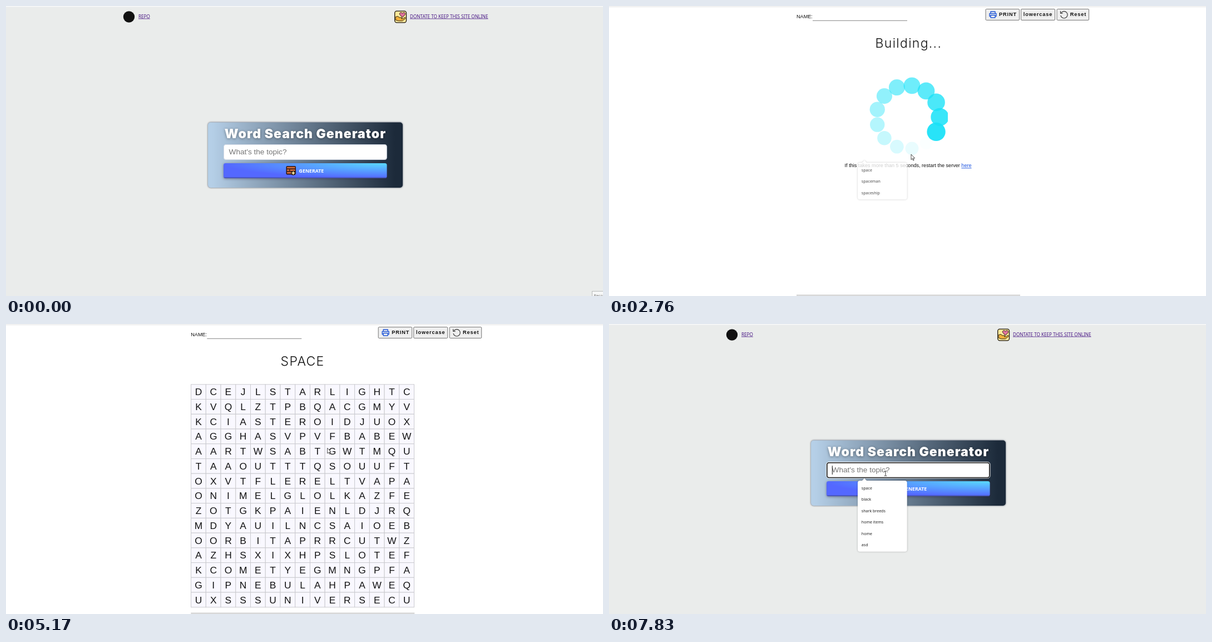
Recreate the animation shown at these times as an HTML page. Size 1073 by 522 pixels, loop 8 s.

```html
<!DOCTYPE html>
<html lang="en">
<head>
<meta charset="utf-8">
<title>Word Search Generator</title>
<style>
html, body { margin: 0; width: 100%; height: 100%; overflow: hidden; background: #fff; }
svg { display: block; width: 1073px; height: 522px; }
text { white-space: pre; }
.sans { font-family: "Liberation Sans", Arial, sans-serif; }
.noto { font-family: "Noto Sans", "Open Sans", sans-serif; }
.head { font-family: Inter, Roboto, sans-serif; text-anchor: middle; }
.link { font-size: 8.13px; font-weight: 500; fill: #4b1a86; text-decoration: underline; }
.card { filter: drop-shadow(0 0 1.5px rgba(25, 35, 55, .75)); }
.brand { font-size: 23px; font-weight: 900; letter-spacing: 1px; fill: #fff; filter: drop-shadow(0 1.5px 2.5px rgba(0, 0, 0, .4)); }
.title { font-size: 23px; font-weight: 300; letter-spacing: 1.3px; fill: #111; }
.cta { filter: drop-shadow(0 1.5px 2px rgba(45, 35, 66, .5)); }
.field { font-size: 13.6px; }
.list { filter: drop-shadow(0 .5px 1.5px rgba(0, 0, 0, .28)); }
.list text { font-size: 7.07px; font-weight: 500; fill: #222; }
.small { font-size: 9.1px; fill: #111; }
.btn rect { fill: #efefef; stroke: #767676; }
.btn text { font-size: 9.2px; font-weight: 700; letter-spacing: .9px; fill: #111; }
.grid rect { fill: #f9f8ff; stroke: #cbcbcf; }
.grid text { font-size: 17.4px; text-anchor: middle; fill: #111; }
</style>
</head>
<body>
<svg viewBox="0 0 1073 522">
  <defs>
    <linearGradient id="cardFill">
      <stop offset="0.02" stop-color="#b5cfe7"/>
      <stop offset="0.96" stop-color="#1c2a3a"/>
    </linearGradient>
    <radialGradient id="ctaFill" cx="1" cy="0" r="1">
      <stop offset="0" stop-color="#5adaff"/>
      <stop offset="1" stop-color="#5468ff"/>
    </radialGradient>
    <clipPath id="ctaClip"><rect x="391" y="283" width="293.6" height="27" rx="3.5"/></clipPath>
    <clipPath id="spinClip"><rect x="467" y="128" width="142" height="143"/></clipPath>
  </defs>

  <g id="home">
    <rect width="1073" height="522" fill="#eaeceb"/>
    <rect width="1073" height="1.5" fill="#f9f9f9"/>
    <circle cx="221" cy="19.5" r="10.2" fill="#111"/>
    <text class="noto link" x="238" y="21.6">REPO</text>
    <g id="donate" stroke="#1a1208" stroke-linejoin="round">
      <rect x="698.7" y="9.2" width="20.8" height="20.6" rx="3.5" fill="#fdea9c" stroke-width="1.3"/>
      <path d="M712.5 20.5 707.8 15.6C706 12.6 709.8 10 712.5 13 715.2 10 719 12.6 717.2 15.6Z" fill="#e0729c" stroke-width=".9"/>
      <path d="M700.2 19.5 704 18.6 707.5 20.8H711.5Q712.6 22.4 710.6 23L713.4 22.8 717 20.4Q718.8 21 717.8 22.6L712.4 26.8H705.5L700.2 25.2Z" fill="#f0b13c" stroke-width=".9"/>
    </g>
    <text class="noto link" x="726" y="21.6">DONTATE TO KEEP THIS SITE ONLINE</text>

    <rect class="card" x="363" y="209.5" width="350" height="117.5" rx="5" fill="url(#cardFill)"/>
    <text class="head brand" x="538" y="238">Word Search Generator</text>

    <rect x="391.5" y="249.5" width="292.8" height="27" rx="3.5" fill="#fff" stroke="#d3dae6"/>
    <g id="focus" fill="none">
      <rect x="390.6" y="248.5" width="294.4" height="29" rx="4.5" stroke="#fff"/>
      <rect x="391.8" y="249.7" width="292" height="26.8" rx="3.5" stroke="#101010" stroke-width="1.6"/>
    </g>
    <text id="topic" class="sans field" x="400.6" y="267.2"></text>
    <rect id="caret" y="255" width="1" height="16" fill="#111"/>

    <g class="cta">
      <rect x="391" y="283" width="293.6" height="27" rx="3.5" fill="url(#ctaFill)"/>
      <rect x="391" y="308.3" width="293.6" height="1.7" fill="#3a416f" opacity=".5" clip-path="url(#ctaClip)"/>
    </g>
    <rect x="503.5" y="288" width="17.5" height="15.5" rx="2" fill="#2b1512"/>
    <path d="M505 289.6h14.6v3h-14.6zM505 294h4.2v3h-4.2zM510.4 294h9.2v3h-9.2zM505 298.4h8v3.4h-8z" fill="#cc6a3c"/>
    <circle cx="516.3" cy="300.6" r="4.2" fill="#3a2418"/>
    <path d="M516.3 297l1.1 2.5 2.5 1.1-2.5 1.1-1.1 2.5-1.1-2.5-2.5-1.1 2.5-1.1z" fill="#fff0a8"/>
    <text class="noto" x="526.6" y="300.1" font-size="8.8" font-weight="600" fill="#fff">GENERATE</text>

    <g id="tip">
      <rect x="1053.5" y="513.5" width="24" height="12" fill="#f6f7f7" stroke="#b9bbbb"/>
      <text class="noto" x="1056.5" y="523.5" font-size="7.2" fill="#777">Recording</text>
    </g>
  </g>

  <g id="sheet">
    <rect width="1073" height="522" fill="#fff"/>
    <rect y="1" width="1073" height="1" fill="#e2e2e2"/>
    <g id="lines">
      <text class="sans small" x="337" y="21.7">NAME:</text>
      <path d="M366 26.3H536" stroke="#858585"/>
      <path d="M337 520.5H739" stroke="#a8a8a8"/>
    </g>
    <g id="tools" class="sans btn">
      <rect x="677" y="5.5" width="60.5" height="20" rx="1.5"/>
      <rect x="740.5" y="5.5" width="61" height="20" rx="1.5"/>
      <rect id="reset" x="805" y="5.5" width="57.5" height="20" rx="1.5"/>
      <text x="701" y="18.3">PRINT</text>
      <text x="744.8" y="18.3">lowercase</text>
      <text x="828.8" y="18.3">Reset</text>
      <path d="M686 13.5V10h8v3.5M686 18.5h-2v-5h12v5h-2M686 16.5h8v4.5h-8z" fill="none" stroke="#2358d8" stroke-width="1.4" stroke-linejoin="round"/>
      <path d="M812.6 12.6A6.2 6.2 0 1 1 811.8 16.8M811.5 9v4.2h4.2" fill="none" stroke="#333" stroke-width="1.1"/>
    </g>
    <text id="title" class="head title" y="75"></text>
    <g id="build">
      <g id="spinner" clip-path="url(#spinClip)" fill="#1ae2f8"></g>
      <text class="sans small" x="423.6" y="290.4">If this takes more than 5 seconds, restart the server <tspan fill="#1a52e0" text-decoration="underline">here</tspan></text>
    </g>
    <g id="grid" class="sans grid"></g>
  </g>

  <g id="list" class="noto list">
    <path d="M454 283 459 277.8 464 283Z" fill="#fff"/>
    <rect id="panel" x="447" y="282" width="88.7" rx="4" fill="#fff"/>
  </g>

  <path id="arrow" d="M0 0V9.6L2.2 7.6 3.7 11 5.2 10.3 3.7 7H6.7Z" fill="#fff" stroke="#222" stroke-width=".8" stroke-linejoin="round"/>
  <path id="beam" d="M-2.3-4.2H-.6L0-3.7.6-4.2H2.3M0-3.7V3.7M-2.3 4.2H-.6L0 3.7.6 4.2H2.3" fill="none" stroke="#222" stroke-width=".9"/>
</svg>

<script>
const LOOP = 8000, SUBMIT = 2760, READY = 3570, RESET = 6700;
const $ = id => document.getElementById(id);
const show = (id, on) => { $(id).style.display = on ? '' : 'none'; };

function add(parent, tag, attrs, text) {
  const el = document.createElementNS('http://www.w3.org/2000/svg', tag);
  for (const k in attrs) el.setAttribute(k, attrs[k]);
  if (text) el.textContent = text;
  return $(parent).appendChild(el);
}

const letters = `DCEJLSTARLIGHTC KVQLZTPBQACGMYV KCIASTEROIDJUOX AGGHASVPVFBABEW
AARTWSABTGWTMQU TAAOUTTTQSOUUFT OXVTFLERELTVAPA ONIMELGLOLKAZFE ZOTGKPAIENLDJRQ
MDYAUILNCSAIOEB OORBITAPRRCUTWZ AZHSXIXHPSLOTEF KCOMETYEGMNGPFA GIPNEBULAHPAWEQ
UXSSSUNIVERSECU`.split(/\s+/);
const CELL = 26.73;
letters.forEach((row, r) => [...row].forEach((ch, c) => {
  const x = 332.6 + c * CELL, y = 108.8 + r * CELL;
  add('grid', 'rect', { x, y, width: CELL, height: CELL });
  add('grid', 'text', { x: x + CELL / 2, y: y + 19.5 }, ch);
}));

const DOTS = 13, RING = 57;
const dots = Array.from({ length: DOTS }, (_, i) => {
  const a = (i + 1) / DOTS * 2 * Math.PI;
  return add('spinner', 'circle', { cx: 537.6 + RING * Math.cos(a), cy: 199.9 + RING * Math.sin(a) });
});

const rows = Array.from({ length: 6 }, (_, i) =>
  add('list', 'text', { x: 453.8, y: 297.6 + 20.5 * i }));
const recent = ['space', 'black', 'shark breeds', 'home items', 'home', 'asd'];
const withS = ['space', 'shark breeds', 'spaceman', 'spaceship', 'sea', 'sun'];
const withSp = ['space', 'spaceman', 'spaceship'];

// [time, text, caret x]
const typing = [[1770, 's', 407.4], [2030, 'sp', 415], [2170, 'spa', 422.5], [2260, 'spac', 429.3], [2360, 'space', 437]];

// [time, x, y], eased between neighbours
const path = [
  [70, 230, 9], [850, 543, 267], [4429, 543, 267], [4430, 545, 266.5], [4500, 543.5, 267],
  [4920, 543.5, 267], [5770, 706, 59], [5800, 706, 59], [6360, 840, 31], [6600, 845, 15],
  [6660, 845, 15], [7030, 511, 287], [7490, 497, 269], [LOOP, 497, 269]
];
const stretch = [[RESET, 1], [7030, 1.5], [7560, 1]];
const fade = [
  [0, 0], [920, 0], [1110, 1], [SUBMIT - 1, 1], [SUBMIT, .8], [2950, 0],
  [7580, 0], [7760, 1], [LOOP, 1]
];

function at(keys, t) {
  if (t <= keys[0][0]) return keys[0].slice(1);
  const i = keys.findIndex(k => k[0] > t);
  if (i < 0) return keys[keys.length - 1].slice(1);
  const a = keys[i - 1], b = keys[i], p = (t - a[0]) / (b[0] - a[0]), e = p * p * (3 - 2 * p);
  return a.slice(1).map((v, j) => v + (b[j + 1] - v) * e);
}

function drawHome(t) {
  const focus = t >= 920 && t < SUBMIT || t >= 7560;
  const typed = t < SUBMIT ? typing.filter(k => k[0] <= t).pop() : null;
  show('focus', focus);
  show('tip', t < 70);
  show('caret', focus && !(t >= 1370 && t < 1770));
  $('caret').setAttribute('x', typed ? typed[2] : 400.8);
  $('topic').textContent = typed ? typed[1] : "What's the topic?";
  $('topic').setAttribute('fill', typed ? '#222' : '#757575');
  const s = t < RESET ? 1 : at(stretch, t)[0];
  $('donate').setAttribute('transform', `translate(0 ${19.3 * (1 - s)}) scale(1 ${s})`);
}

function drawSheet(t) {
  const ready = t >= READY;
  show('build', !ready);
  show('grid', ready);
  $('lines').setAttribute('transform', `translate(${ready ? -4.7 : 0})`);
  $('tools').setAttribute('transform', `translate(${ready ? -7.8 : 0})`);
  $('reset').style.fill = t > 6430 ? '#e3e3e3' : '';
  $('title').textContent = ready ? 'SPACE' : 'Building...';
  $('title').setAttribute('x', ready ? 533.1 : 538.4);
  dots.forEach((dot, i) => {
    const age = ((t - SUBMIT) / 1000 + .06 - i / DOTS + 1) % 1;
    dot.setAttribute('r', 17 - 5.6 * age);
    dot.setAttribute('opacity', 1 - age);
  });
}

function drawList(t) {
  const items = t < 1770 || t > RESET ? recent : t < 2030 ? withS : withSp;
  rows.forEach((row, i) => { row.textContent = items[i] || ''; });
  $('panel').setAttribute('height', 4.7 + 20.5 * items.length);
  $('list').setAttribute('opacity', at(fade, t)[0]);
}

function drawPointer(t, home) {
  const [x, y] = at(path, t);
  const beam = home && x > 391 && x < 685 && y > 249 && y < 277;
  show('beam', beam);
  show('arrow', !beam && t >= 70);
  $('beam').setAttribute('transform', `translate(${x} ${y})`);
  $('arrow').setAttribute('transform', `translate(${x} ${y})`);
}

const start = performance.now();
function frame() {
  const t = Math.max(0, performance.now() - start) % LOOP;
  const home = t < SUBMIT || t >= RESET;
  show('home', home);
  show('sheet', !home);
  if (home) drawHome(t); else drawSheet(t);
  drawList(t);
  drawPointer(t, home);
  requestAnimationFrame(frame);
}
frame();
</script>
</body>
</html>
```
